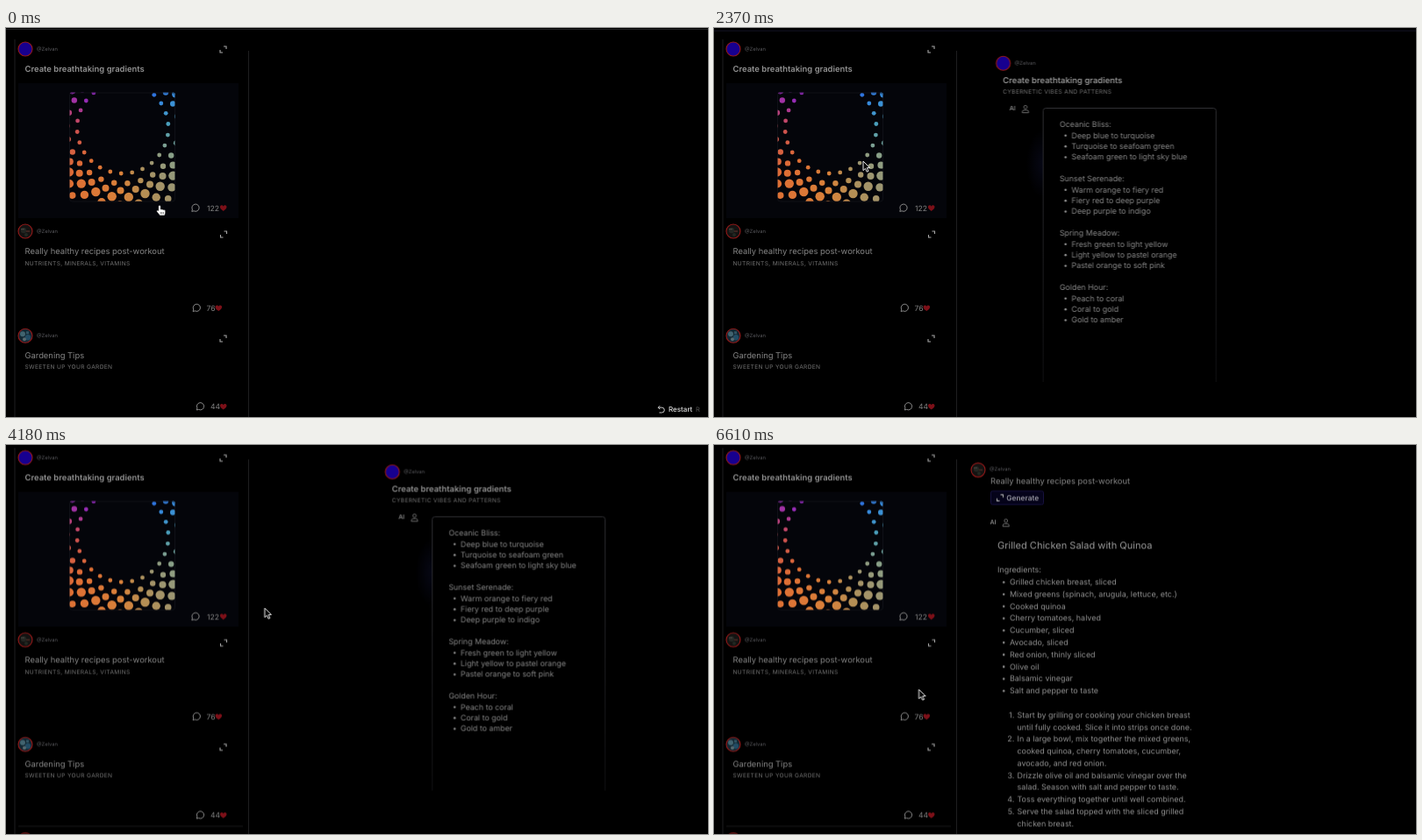
These frames come from a looping animation (800 by 444 pixels, 6.64 s). An HTML page:

```html
<!DOCTYPE html>
<html lang="en">
<head>
<meta charset="utf-8">
<title>Feed</title>
<style>
html, body { margin: 0; width: 100%; height: 100%; overflow: hidden; background: #000; }
svg { display: block; width: 800px; height: 444px; }
text { font-family: Inter, "Open Sans", sans-serif; text-rendering: geometricPrecision; white-space: pre; }
.page, .first, .second, .pointer, .hand, .arrow, .restart, .bar, .bar2 {
  animation: 6640ms linear infinite;
}
.page { animation-name: scroll; }
.first { animation-name: first; }
.second { animation-name: second; }
.pointer { animation-name: move; }
.hand, .bar { animation-name: early; }
.arrow, .bar2 { animation-name: late; }
.restart { animation-name: fade; }

@keyframes scroll {
  0%, 51.2% { transform: translateY(0); animation-timing-function: ease-in-out; }
  57.2%, 100% { transform: translateY(-9.6px); }
}
@keyframes first {
  0%, 28.77% { transform: translateX(490px); animation-timing-function: cubic-bezier(.33,1,.68,1); }
  37.67%, 59.19% { transform: translateX(0); animation-timing-function: cubic-bezier(.65,0,.35,1); }
  68.98%, 100% { transform: translateX(514px); }
}
@keyframes second {
  0%, 70.03% { transform: translateX(510px); animation-timing-function: cubic-bezier(.33,1,.68,1); }
  80.15%, 100% { transform: translateX(0); }
}
@keyframes move {
  0%, 8.28% { transform: translate(175px,203px); }
  21.08% { transform: translate(175.3px,200px); }
  24.5% { transform: translate(174px,196px); animation-timing-function: ease-in-out; }
  35.69% { transform: translate(170px,152px); animation-timing-function: ease-in-out; }
  47.89% { transform: translate(316px,162px); }
  54% { transform: translate(319px,169px); animation-timing-function: ease-in; }
  62.95% { transform: translate(295px,186px); animation-timing-function: ease-out; }
  74.4% { transform: translate(205px,252px); animation-timing-function: ease-in-out; }
  92%, 100% { transform: translate(233.5px,279px); }
}
@keyframes early { 0%, 28.5% { opacity: 1; } 28.51%, 100% { opacity: 0; } }
@keyframes late { 0%, 28.5% { opacity: 0; } 28.51%, 100% { opacity: 1; } }
@keyframes fade { 0%, 25.6% { opacity: 1; } 28.3%, 100% { opacity: 0; } }
</style>
</head>
<body>
<svg id="stage" viewBox="0 0 800 444" xmlns="http://www.w3.org/2000/svg"></svg>
<script>
const USER = "@Zelvan";

// y is the middle of the capital letters
const text = (x, y, size, fill, str, extra = "") =>
  `<text x="${x}" y="${y + size * .36}" font-size="${size}" fill="${fill}" ${extra}>${str}</text>`;
const rect = (x, y, w, h, fill, extra = "") =>
  `<rect x="${x}" y="${y}" width="${w}" height="${h}" fill="${fill}" ${extra}/>`;
const circle = (x, y, r, fill, extra = "") =>
  `<circle cx="${x}" cy="${y}" r="${r}" fill="${fill}" ${extra}/>`;
const path = (d, stroke, extra = "") =>
  `<path d="${d}" fill="none" stroke="${stroke}" ${extra}/>`;
const at = (x, y, body) => `<g transform="translate(${x} ${y})">${body}</g>`;

const expand = (x, y, color = "#a8a8a8") => at(x, y,
  path("M.5-3.5H3.5V-.5M-.5 3.5H-3.5V.5", color, 'stroke-width="1.1"'));
const bubble = (x, y) => at(x, y,
  path("M-3.6 1.9A4.1 4.1 0 1 1-1.9 3.6L-4.2 4.2Z", "#8c8c8c", 'stroke-linejoin="round"'));
const heart = (x, y) => at(x, y,
  '<path d="M0 3.5C-2 2-3.8.5-3.8-1.2C-3.8-3.6-.8-3.9 0-1.8C.8-3.9 3.8-3.6 3.8-1.2C3.8.5 2 2 0 3.5Z" fill="#7c1018"/>');
const person = (x, y) => at(x, y,
  circle(0, -2.2, 1.9, "none", 'stroke="#777" stroke-width=".9"') +
  path("M-3.6 4.2V3.4Q-3.6 1.2-1.4 1.2H1.4Q3.6 1.2 3.6 3.4V4.2Z", "#777", 'stroke-width=".9"'));

const faces = {
  plain: circle(0, 0, 8, "#17008f"),
  bowl: circle(0, 0, 8, "#141312") + circle(-2, -1, 3.2, "#232622") +
    rect(-5, -3, 4, 1.2, "#45433f") + rect(1, -1, 4, 2, "#3b2420") + circle(1, 4, 2, "#222922"),
  garden: circle(0, 0, 8, "#142833") + circle(-3, -2, 3, "#41636f") +
    circle(3, 2, 3.2, "#224c64") + circle(-1, 4, 2, "#56696f") + rect(1, -5, 3, 3, "#305464")
};
const avatar = (x, y, face) => at(x, y, faces[face] +
  circle(0, 0, 8, "none", 'stroke="#961a1a" stroke-width="1.1"'));
const handle = (x, y) => text(x, y, 5.8, "#58585c", USER);
const title = (x, y, str) => text(x, y, 9.38, "#858585", str);
const boldTitle = (x, y, str) => text(x, y, 9.45, "#929292", str, 'font-weight="600"');
const sub = (x, y, str) => text(x, y, 6.6, "#727272", str, 'letter-spacing=".35"');
const ai = (x, y) => text(x, y, 7, "#858585", "AI", 'font-weight="600"');
const stats = (x, y, n, hx, bx) =>
  bubble(bx, y) + text(x, y + .3, 8.6, "#808080", n) + heart(hx, y + .3);

// Hue of a dot by its angle around the ring, clockwise from the right
const hues = [
  [-60, 40, 95, 225], [-30, 56, 142, 218], [0, 78, 162, 182], [30, 138, 160, 136],
  [50, 156, 150, 114], [70, 178, 143, 86], [90, 216, 130, 58], [135, 222, 110, 52],
  [180, 204, 80, 80], [200, 180, 60, 136], [215, 150, 44, 180], [300, 110, 30, 200]
];
function hue(a) {
  if (a > 300) a -= 360;
  let i = 1;
  while (i < hues.length - 1 && hues[i][0] < a) i++;
  const p = hues[i - 1], q = hues[i], k = (a - p[0]) / (q[0] - p[0]);
  return `rgb(${[1, 2, 3].map(c => Math.round(p[c] + (q[c] - p[c]) * k))})`;
}
// Staggered rings of dots around an empty middle: [ring radius, dot radius]
const rings = [[52, 2.4], [63.5, 3.2], [71.5, 4], [79.2, 5.2], [88, 4.7], [96, 3.8]];
function dots() {
  const n = 26, step = 360 / n;
  return rings.map(([R, r], ring) => Array.from({ length: n }, (_, i) => {
    const a = (92 + (i + ring % 2 / 2) * step) % 360, t = a * Math.PI / 180;
    return circle((133 + R * Math.cos(t)).toFixed(1), (114 + R * Math.sin(t)).toFixed(1), r, hue(a));
  }).join("")).join("");
}

const feed =
  path("M10 13V470M276.5 26V470", "#1e1e20") +
  avatar(22, 24, "plain") + handle(35, 23.5) + expand(247.5, 24.5) +
  boldTitle(21.5, 47, "Create breathtaking gradients") +
  rect(14, 63, 251, 154, "#04050a") +
  `<g clip-path="url(#art)">${dots()}</g>` +
  rect(72.5, 74, 120, 124, "none", 'rx="3" stroke="#191a20" stroke-width=".6"') +
  stats(229, 205.2, "122", 247.7, 216) +
  avatar(22, 232, "bowl") + handle(35, 231.5) + expand(248, 235.5) +
  title(21.5, 255, "Really healthy recipes post-workout") +
  sub(21.5, 268.3, "NUTRIENTS, MINERALS, VITAMINS") +
  stats(228.5, 319.3, "76", 242.3, 217.3) +
  avatar(22, 351.3, "garden") + handle(35, 350.8) + expand(247.5, 354.5) +
  title(21.5, 373.5, "Gardening Tips") +
  sub(21.5, 387, "SWEETEN UP YOUR GARDEN") +
  stats(233, 431.8, "44", 247.7, 221.5) +
  path("M14 444.8H270", "#1a1a1c") + avatar(22, 460.3, "bowl");

const palettes = [
  ["Oceanic Bliss:", "Deep blue to turquoise", "Turquoise to seafoam green", "Seafoam green to light sky blue"],
  ["Sunset Serenade:", "Warm orange to fiery red", "Fiery red to deep purple", "Deep purple to indigo"],
  ["Spring Meadow:", "Fresh green to light yellow", "Light yellow to pastel orange", "Pastel orange to soft pink"],
  ["Golden Hour:", "Peach to coral", "Coral to gold", "Gold to amber"]
];
const bullet = (x, y) => circle(x, y, 1.3, "#8a8a8a");
const gradients =
  avatar(324, 40.3, "plain") + handle(337, 40) +
  boldTitle(323.5, 59.5, "Create breathtaking gradients") +
  sub(323.5, 72.5, "CYBERNETIC VIBES AND PATTERNS") +
  ai(331, 91.5) + person(349.3, 92.5) +
  rect(350, 115, 40, 80, "url(#glow)") +
  rect(370, 92, 196, 312, "#000") +
  path("M369.5 404V94.5Q369.5 91.5 372.5 91.5H563.5Q566.5 91.5 566.5 94.5V404", "url(#edge)") +
  palettes.flatMap((group, g) => group.map((str, i) => {
    const y = 110 + g * 62 + i * 12.42;
    return (i ? bullet(395, y + .3) : "") + text(i ? 401.8 : 388.2, y, 8.85, "#878787", str);
  })).join("");

const ingredients = ["Grilled chicken breast, sliced", "Mixed greens (spinach, arugula, lettuce, etc.)",
  "Cooked quinoa", "Cherry tomatoes, halved", "Cucumber, sliced", "Avocado, sliced",
  "Red onion, thinly sliced", "Olive oil", "Balsamic vinegar", "Salt and pepper to taste"];
const steps = [
  ["Start by grilling or cooking your chicken breast", "until fully cooked. Slice it into strips once done."],
  ["In a large bowl, mix together the mixed greens,", "cooked quinoa, cherry tomatoes, cucumber,", "avocado, and red onion."],
  ["Drizzle olive oil and balsamic vinegar over the", "salad. Season with salt and pepper to taste."],
  ["Toss everything together until well combined."],
  ["Serve the salad topped with the sliced grilled", "chicken breast."]
];
const body = (x, y, str, extra) => text(x, y, 8.95, "#909090", str, extra);
let row = 0;
const recipe =
  avatar(301, 28.5, "bowl") + handle(314, 27.5) +
  title(315, 41.5, "Really healthy recipes post-workout") +
  rect(315.5, 52.5, 60, 15.5, "#05031a", 'rx="2" stroke="#17123f"') +
  expand(326, 60.3) + text(333.3, 60.3, 8.4, "#a8a8b0", "Generate", 'font-weight="500"') +
  ai(314.5, 87.5) + person(332.7, 88.7) +
  text(323, 114, 11.05, "#999", "Grilled Chicken Salad with Quinoa") +
  body(323, 142.5, "Ingredients:") +
  ingredients.map((str, i) => {
    const y = 156.3 + i * 13.78;
    return bullet(330.2, y + .3) + body(337, y, str);
  }).join("") +
  steps.map((lines, n) => lines.map((str, i) => {
    const y = 308 + row++ * 13.78;
    return (i ? "" : body(342.3, y, n + 1 + ".", 'text-anchor="end"')) + body(345.5, y, str);
  }).join("")).join("");

const hand = '<path d="M-1.2 5.5V.6Q-1.2-.6 0-.6Q1.2-.6 1.2.6V4Q2.3 3.3 3 4.3Q4 3.7 4.7 4.7Q6.4 4.2 6.6 5.8V8Q6.4 9.6 5.6 10.9H.4Q-1.4 8.8-3.2 6.6Q-3.5 5.2-2.2 5Z" fill="#fff" stroke="#222" stroke-width=".5"/>' +
  path("M1.2 7V9.4M2.8 7V9.4M4.4 7V9.4", "#333", 'stroke-width=".6"');
const arrow = '<path d="M0 0V10.6L2.5 8.4L4.2 12.2L6 11.4L4.3 7.7L7.6 7.5Z" fill="#080808" stroke="#e8e8e8" stroke-width="1" stroke-linejoin="round"/>';

document.getElementById("stage").innerHTML = `
<defs>
  <clipPath id="art"><rect x="72" y="73.5" width="121" height="124.5" rx="3"/></clipPath>
  <radialGradient id="glow"><stop stop-color="#070816"/><stop offset="1" stop-color="#000"/></radialGradient>
  <linearGradient id="edge" x2="0" y2="1"><stop stop-color="#303034"/><stop offset="1" stop-color="#111113"/></linearGradient>
</defs>
<g class="page">
  <g class="bar">${rect(0, 1, 800, 1, "#222224")}</g>
  <g class="bar2">${rect(0, 2.5, 800, 1.5, "#0d0d18")}</g>
  ${feed}
  <g class="first">${gradients}</g>
  ${at(0, 9.6, `<g class="second">${recipe}</g>`)}
</g>
<g class="restart">
  ${path("M743.3 433.2H747.4A2.9 2.9 0 0 1 747.4 439H744.5M745.2 431.2L743.2 433.2L745.2 435.2", "#ccc")}
  ${text(755, 435.2, 8, "#dedede", "Restart", 'font-weight="500"')}
  ${text(786, 435.2, 7.5, "#555", "R")}
</g>
<g class="pointer"><g class="hand">${hand}</g><g class="arrow">${arrow}</g></g>`;
</script>
</body>
</html>
```
